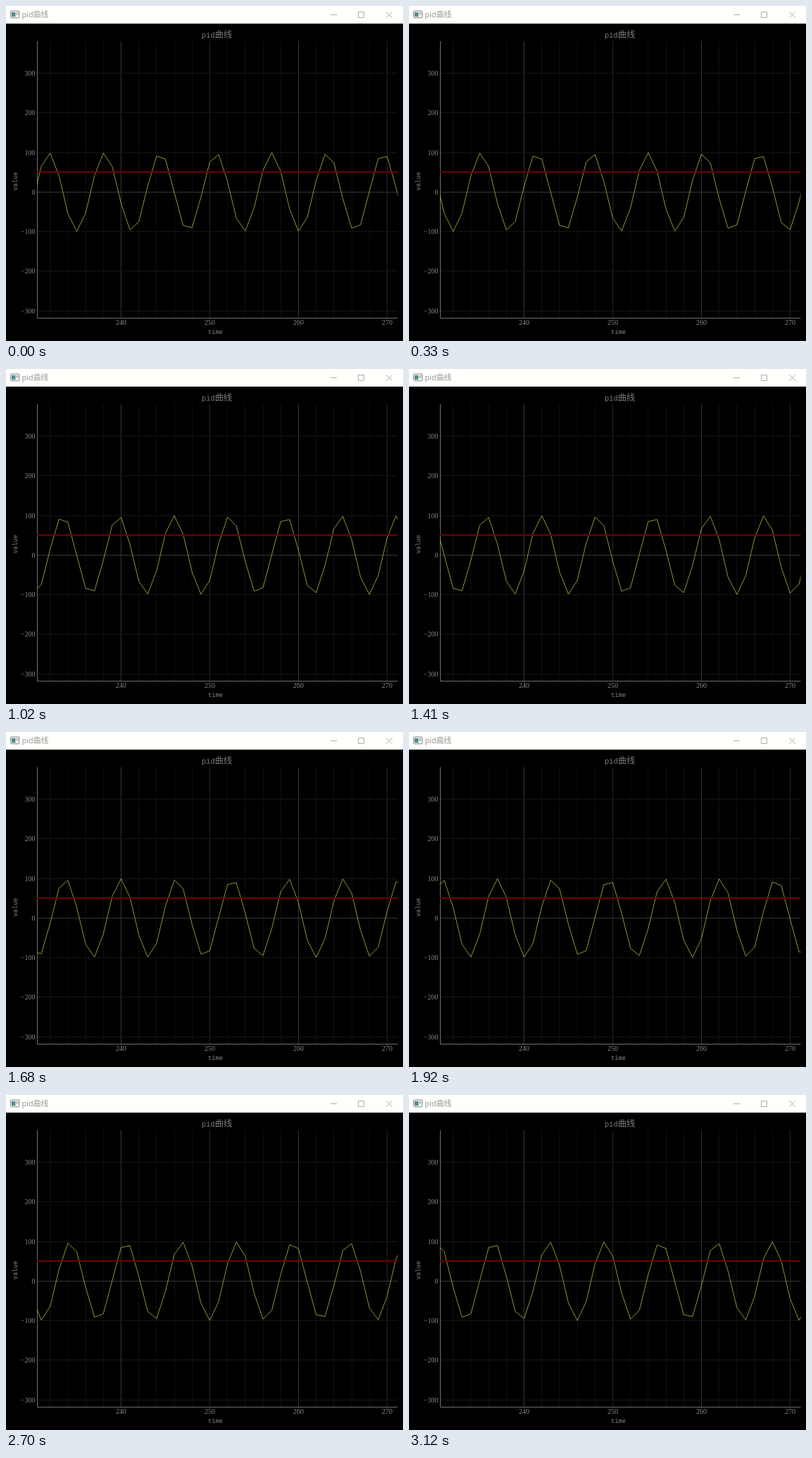
Recreate the animation shown at these times as an HTML page. Size 564x476 px, loop 3.21 s.

```html
<!DOCTYPE html>
<html lang="zh">
<head>
<meta charset="utf-8">
<title>pid曲线</title>
<style>
  html, body { margin: 0; width: 100%; height: 100%; overflow: hidden; background: #000; }
  svg { display: block; width: 564px; height: 476px; }
  .tick { font: 10px "Liberation Serif", "Times New Roman", serif; fill: #888; }
  .label { font: 8.8px "Liberation Mono", "Courier New", monospace; fill: #888; text-anchor: middle; }
  .title { font: 10.4px "Liberation Mono", "Courier New", monospace; fill: #7c7c7c; }
  .title .han { font: 300 12.2px "Noto Sans CJK SC", "Noto Sans CJK", sans-serif; }
  .caption { font: 10.8px "Noto Sans", "Noto Sans CJK SC", "Noto Sans CJK", sans-serif; fill: #989898; }
  .button { fill: none; stroke: #a4a4a4; stroke-width: .9; }
</style>
</head>
<body>
<svg viewBox="0 0 564 476" xmlns="http://www.w3.org/2000/svg">
  <defs>
    <linearGradient id="pane" x1="0" y1="0" x2="1" y2="1">
      <stop offset="0" stop-color="#4d7f9c"/>
      <stop offset="1" stop-color="#4f9a78"/>
    </linearGradient>
    <clipPath id="view"><rect x="44" y="50" width="512.5" height="393"/></clipPath>
  </defs>
  <rect width="564" height="476"/>

  <rect width="564" height="25" fill="#fffffb"/>
  <rect x="6.5" y="7" width="12.5" height="9.8" rx="1" fill="#f2f2f2" stroke="#85898c"/>
  <rect x="8" y="9" width="5.4" height="6.2" fill="url(#pane)"/>
  <path d="M15.2 9V12.5M17 9V12.5" stroke="#8f9496" stroke-width=".9"/>
  <text class="caption" x="22.6" y="16">pid曲线</text>
  <path class="button" d="M461 12.5H470M500.5 8.5H508.5V16.5H500.5ZM540.3 8.3L548.8 16.8M548.8 8.3L540.3 16.8"/>

  <text class="title" x="278" y="45">pid<tspan class="han">曲线</tspan></text>
  <g id="grid"></g>
  <path d="M44.5 50V443.5H556.5" fill="none" stroke="#707070"/>
  <g id="ticks"></g>
  <text class="label" x="297.5" y="465.5">time</text>
  <text class="label" transform="translate(15.5 249) rotate(-90)">value</text>

  <g clip-path="url(#view)" fill="none">
    <path id="wave" stroke="#d2d24c" stroke-width=".7" stroke-linejoin="bevel"/>
    <path d="M44 236H557" stroke="#6c0000" stroke-width="2"/>
  </g>
</svg>
<script>
  const LOOP = 3210, TICK = 30;
  // Ticks between successive one-sample shifts of the wave.
  const GAPS = [3, 3, 3, 4, 3, 3, 3, 3, 3, 3, 3, 4, 3, 3, 3, 4, 5,
                3, 3, 2, 3, 3, 2, 3, 4, 3, 3, 2, 3, 3, 4, 3, 4];
  let sum = 0;
  const stepTimes = GAPS.map(gap => (sum += gap) * TICK);

  const px = time => 163.5 + (time - 240) * 12.597;
  const py = value => 264.4 - value * 0.5625;
  const byId = id => document.getElementById(id);

  function add(parent, name, attrs, text = "") {
    const node = document.createElementNS("http://www.w3.org/2000/svg", name);
    for (const key in attrs) node.setAttribute(key, attrs[key]);
    node.textContent = text;
    byId(parent).appendChild(node);
  }

  const gridLine = (d, stroke) => add("grid", "path", { d, stroke });

  function tickText(x, y, value, anchor) {
    add("ticks", "text", { class: "tick", x, y, "text-anchor": anchor },
      String(value).replace("-", "−"));
  }

  for (let t = 232; t <= 270; t += 2) {
    const x = Math.floor(px(t)) + 0.5;
    gridLine(`M${x} 50V443`, t % 20 === 0 ? "#363636" : t % 10 === 0 ? "#242424" : "#101010");
    if (t % 10 === 0) tickText(px(t), 452.8, t, "middle");
  }
  for (let v = -300; v <= 300; v += 100) {
    const y = Math.floor(py(v)) + 0.5;
    gridLine(`M44 ${y}H556.5`, v === 0 ? "#363636" : "#161616");
    tickText(41.5, py(v) + 3.5, v, "end");
  }

  function drawWave(shift) {
    const points = [];
    for (let t = 230; t <= 272; t++) {
      points.push(px(t).toFixed(2) + " " + py(99.5 * Math.sin(t - 224 + shift)).toFixed(2));
    }
    byId("wave").setAttribute("d", "M" + points.join("L"));
  }

  const start = performance.now();
  function frame() {
    const now = (performance.now() - start) % LOOP;
    drawWave(stepTimes.filter(time => time <= now).length);
    requestAnimationFrame(frame);
  }
  frame();
</script>
</body>
</html>
```
